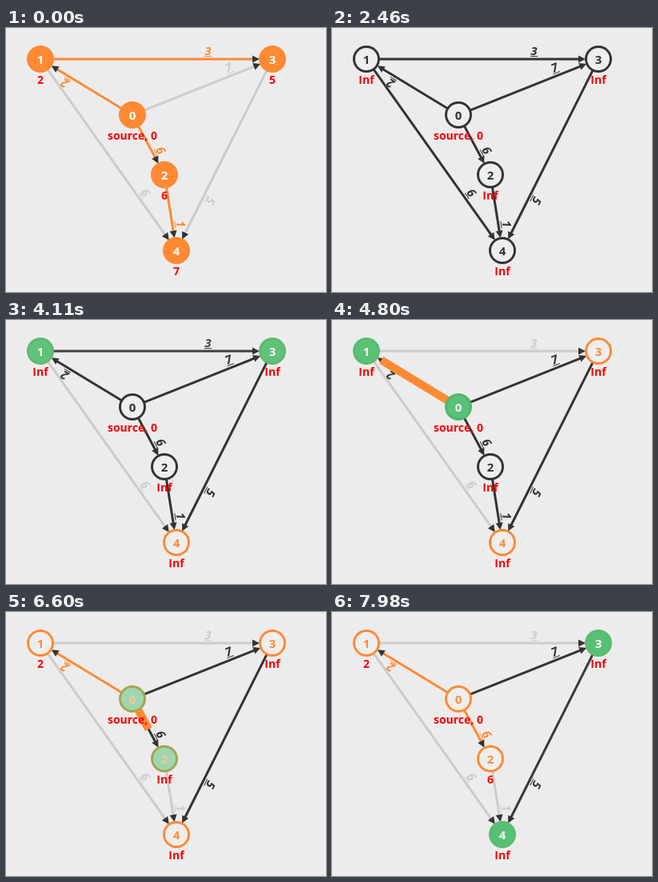
These frames come from a looping animation (400x331 px, 8 s). An HTML page with a canvas:

```html
<!DOCTYPE html>
<html lang="en">
<head>
<meta charset="utf-8">
<title>Shortest paths, edge by edge</title>
<style>
  html, body { margin: 0; width: 100%; height: 100%; overflow: hidden; background: #ececed; }
  canvas { display: block; }
</style>
</head>
<body>
<canvas id="stage" width="400" height="331"></canvas>
<script>
const ctx = document.getElementById('stage').getContext('2d');
const LOOP = 8000, STEP = 470;
const FONT = '"Open Sans", "Noto Sans", sans-serif';

const rgb = hex => [1, 3, 5].map(i => parseInt(hex.slice(i, i + 2), 16));
const css = color => `rgb(${color.map(Math.round).join()})`;
const ORANGE = rgb('#ff8a33'), GREEN = rgb('#51be70'), DARK = rgb('#333333'),
      GRAY = rgb('#cccccc'), PALE = rgb('#eeeeee'), WHITE = rgb('#ffffff');

const PLAIN   = { ring: DARK,   fill: PALE,   text: DARK };
const VISITED = { ring: ORANGE, fill: PALE,   text: ORANGE };
const ACTIVE  = { ring: GREEN,  fill: GREEN,  text: WHITE };
const SOLID   = { ring: ORANGE, fill: ORANGE, text: WHITE };

const nodes = [[158, 109], [43, 39], [198, 184], [333, 39], [213, 279]];
const links = [[0, 1, 2], [0, 2, 6], [0, 3, 7], [1, 3, 3], [1, 4, 6], [2, 4, 1], [3, 4, 5]];
const edges = links.map(([from, to, weight]) => {
  const [x, y] = nodes[from], dx = nodes[to][0] - x, dy = nodes[to][1] - y;
  return { from, to, weight, x, y, angle: Math.atan2(dy, dx), start: 16, end: Math.hypot(dx, dy) - 16 };
});
const TREE = [0, 1, 3, 5];
const RESET = 1050;

// Each relaxation: time it is settled, edge index, resulting colour, new distance
const relaxations = [
  [2940, 4, GRAY], [3930, 3, GRAY], [4920, 0, ORANGE, '2'],
  [5880, 5, GRAY], [6840, 1, ORANGE, '6'], [7830, 6, GRAY],
].map(([at, edge, color, distance]) => ({ at, edge, color, distance, grow: at - 475, fade: at + 50 }));

const everyNode = nodes.map((_, i) => i), everyEdge = edges.map((_, i) => i);
const changes = [
  { at: 1540, nodes: everyNode, style: SOLID, edges: everyEdge, color: GRAY },
  { at: 2010, nodes: everyNode, style: PLAIN, edges: everyEdge, color: DARK },
];
for (const r of relaxations) {
  const ends = [edges[r.edge].from, edges[r.edge].to];
  changes.push({ at: r.grow, nodes: ends, style: ACTIVE, edges: [] });
  changes.push({ at: r.fade, nodes: ends, style: VISITED, edges: [r.edge], color: r.color });
}

const mix = (a, b, k) => a.map((v, i) => v + (b[i] - v) * k);
function progress(t, start) {
  const k = Math.min(1, Math.max(0, (t - start) / STEP));
  return k < .5 ? 4 * k ** 3 : 1 - 4 * (1 - k) ** 3;
}

function stateAt(t) {
  if (t < RESET) return {
    styles: nodes.map(() => SOLID),
    colors: edges.map((_, i) => TREE.includes(i) ? ORANGE : GRAY),
    labels: ['source, 0', '2', '6', '5', '7'],
  };
  const styles = nodes.map(() => PLAIN), colors = edges.map(() => DARK);
  const labels = ['source, 0', 'Inf', 'Inf', 'Inf', 'Inf'];
  for (const c of changes) {
    const k = progress(t, c.at);
    if (!k) continue;
    for (const n of c.nodes) {
      const s = styles[n];
      styles[n] = {
        ring: mix(s.ring, c.style.ring, k),
        fill: mix(s.fill, c.style.fill, k),
        text: mix(s.text, c.style.text, k),
      };
    }
    for (const e of c.edges) colors[e] = mix(colors[e], c.color, k);
  }
  for (const r of relaxations)
    if (r.distance && t >= r.at) labels[edges[r.edge].to] = r.distance;
  return { styles, colors, labels };
}

function write(text, x, y, size, color, slant = '') {
  ctx.font = `${slant} bold ${size}px ${FONT}`;
  ctx.fillStyle = color;
  ctx.fillText(text, x, y);
}

function disc(x, y, radius, color) {
  ctx.fillStyle = css(color);
  ctx.beginPath();
  ctx.arc(x, y, radius, 0, 2 * Math.PI);
  ctx.fill();
}

// Draws along the edge: x runs from its first node to its second
function alongEdge(edge, paint) {
  ctx.save();
  ctx.translate(edge.x, edge.y);
  ctx.rotate(edge.angle);
  paint(edge);
  ctx.restore();
}

function drawEdge(edge, color) {
  alongEdge(edge, ({ start, end, weight }) => {
    ctx.fillStyle = css(color);
    ctx.fillRect(start, -1.5, end - start - 5, 3);
    ctx.fillStyle = css(DARK);
    ctx.beginPath();
    ctx.moveTo(end, 0);
    ctx.lineTo(end - 9, -4.5);
    ctx.lineTo(end - 9, 4.5);
    ctx.fill();
    const middle = start + (end - start) * .75;
    write(weight, middle, -5, 15, css(color), 'italic');
    ctx.fillRect(middle - 4.5, -4, 9, 1);
  });
}

function drawGrowth(t) {
  for (const r of relaxations) {
    if (t < r.grow || t >= r.at) continue;
    alongEdge(edges[r.edge], ({ start, end }) => {
      ctx.fillStyle = css(ORANGE);
      ctx.fillRect(start, -5, (end - start) * progress(t, r.grow), 10);
    });
  }
}

function draw(t) {
  const { styles, colors, labels } = stateAt(t);
  ctx.fillStyle = '#ececed';
  ctx.fillRect(0, 0, 400, 331);
  ctx.textAlign = 'center';
  edges.forEach((edge, i) => drawEdge(edge, colors[i]));
  drawGrowth(t);
  nodes.forEach(([x, y], i) => {
    disc(x, y, 17, styles[i].ring);
    disc(x, y, 14, styles[i].fill);
    write(i, x, y + 5.5, 15, css(styles[i].text));
  });
  nodes.forEach(([x, y], i) => write(labels[i], x, y + 31, 14, '#f00'));
}

const began = performance.now();
function frame() {
  draw((performance.now() - began) % LOOP);
  requestAnimationFrame(frame);
}
frame();
</script>
</body>
</html>
```
